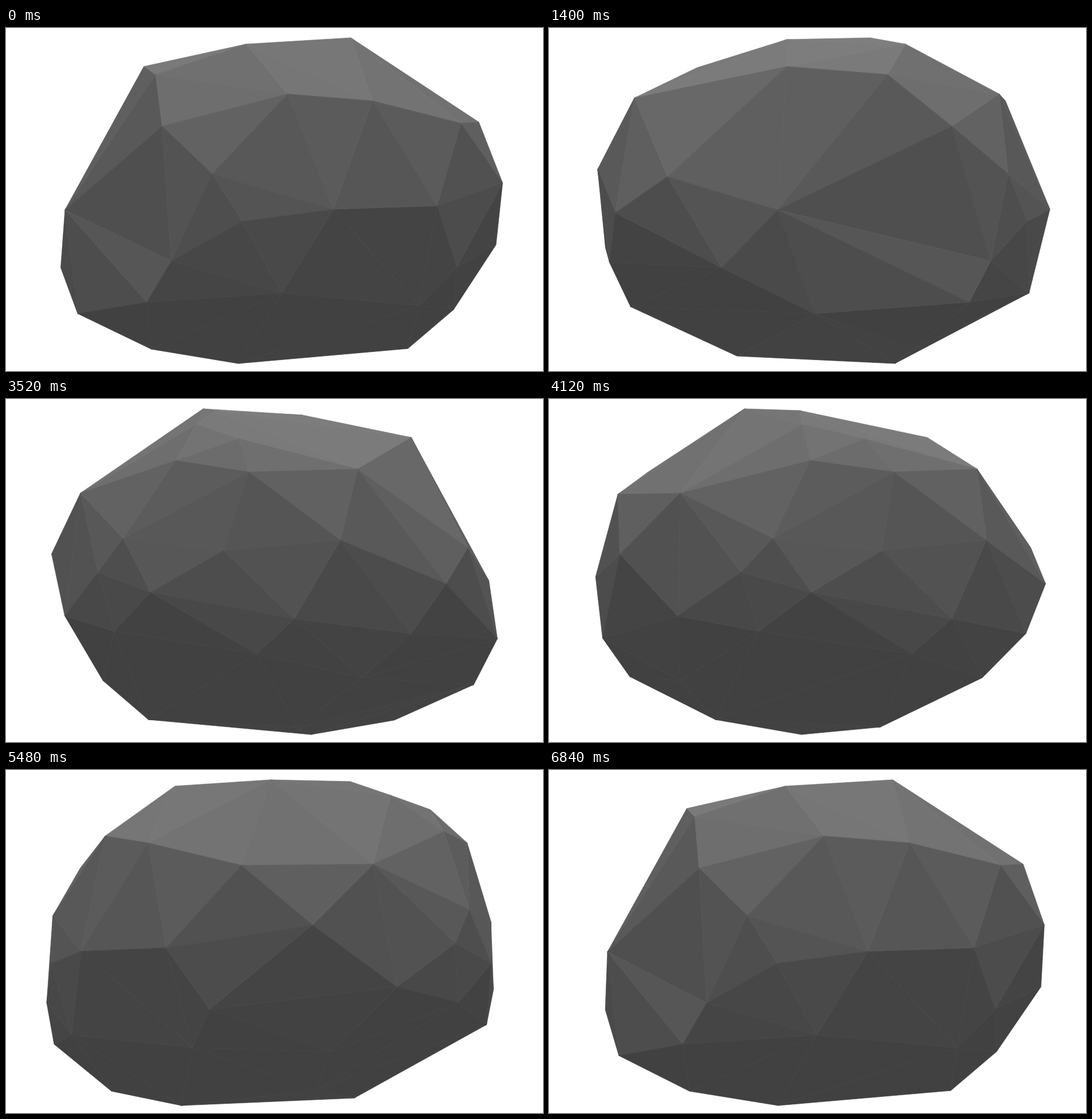
Write an HTML page with a canvas that moves like this. It is 937 by 598 pixels and loops after 6.88 s.

```html
<!DOCTYPE html>
<html lang="en">
<head>
<meta charset="utf-8">
<title>Turning rock</title>
<style>
  html, body { margin: 0; width: 100%; height: 100%; overflow: hidden; background: white; }
  canvas { display: block; }
</style>
</head>
<body>
<canvas id="stage" width="937" height="598"></canvas>
<script>
const canvas = document.getElementById('stage');
const ctx = canvas.getContext('2d');
const LOOP = 6880, STEP = 40, CENTER = 474.5, MIDDLE = 320, RADIUS = 400;
const TAU = 2 * Math.PI;

// Corners of the rock: height on the stage, bearing in degrees, optional dent.
const spots = [
  [17, 22], [20, 320], [28, 108], [44, 314], [67, 178, -29], [69, 289], [81, 139],
  [115, 87], [127, 60], [107, 309], [127, 283], [122, 249], [171, 124], [164, 349], [166, 27],
  [259, 210, -26], [246, 258], [264, 289, -23], [243, 318], [302, 326], [270, 8],
  [254, 107], [316, 76], [337, 99], [310, 46], [337, 308], [383, 270], [322, 227],
  [409, 237], [418, 190], [317, 175, -27], [406, 117], [478, 124], [462, 89], [417, 35],
  [378, 345], [405, 322], [444, 280], [484, 43], [491, 359, -22], [486, 248], [498, 165],
  [560, 133], [585, 114, -70], [572, 261, -47], [559, 0]
];

// Outline of a rounded body with a bulge low on one side.
function reach(y, bearing) {
  if (y < MIDDLE) return RADIUS * (1 - ((MIDDLE - y) / 314) ** 2) ** 0.4;
  const body = RADIUS * Math.sqrt(1 - ((y - MIDDLE) / 285) ** 2.2);
  const low = Math.min(Math.max((y - 360) / 170, 0), 1);
  return body + 100 * low * Math.exp(-(((bearing - 130) / 42) ** 2));
}

const corners = spots.map(([y, bearing, dent = 0]) => {
  const r = reach(y, bearing) + dent, a = bearing * TAU / 360;
  return { x: r * Math.cos(a), y, z: r * Math.sin(a) };
});

const dot = (p, q) => p.x * q.x + p.y * q.y + p.z * q.z;
const sub = (p, q) => ({ x: p.x - q.x, y: p.y - q.y, z: p.z - q.z });
const cross = (p, q) => ({
  x: p.y * q.z - p.z * q.y,
  y: p.z * q.x - p.x * q.z,
  z: p.x * q.y - p.y * q.x
});
const normal = (p, q, r) => cross(sub(q, p), sub(r, p));

// Pull a corner towards the unit sphere so that hollows keep their corners.
function inflate({ x, y, z }) {
  const h = (y - MIDDLE) / 290;
  const k = Math.hypot(x / RADIUS, h, z / RADIUS) ** -0.6;
  return { x: x / RADIUS * k, y: h * k, z: z / RADIUS * k };
}

function makeFace(...points) {
  const n = normal(...points);
  const up = -n.y / Math.hypot(n.x, n.y, n.z);
  const gray = Math.round(76 + 30 * up + 20 * up * up);
  return { points, n, color: `rgb(${gray},${gray},${gray})` };
}

function buildFaces() {
  const ball = corners.map(inflate), faces = [];
  ball.forEach((p, i) => ball.forEach((q, j) => ball.forEach((r, k) => {
    if (i >= j || j >= k) return;
    const n = normal(p, q, r), level = dot(n, p), side = Math.sign(level);
    const outer = ball.every(v =>
      v === p || v === q || v === r || (dot(n, v) - level) * side <= 0);
    if (!outer) return;
    const [a, b, c] = [corners[i], corners[j], corners[k]];
    faces.push(side > 0 ? makeFace(a, b, c) : makeFace(a, c, b));
  })));
  return faces;
}

const faces = buildFaces();

function draw(time) {
  const angle = Math.floor(time % LOOP / STEP) * STEP / LOOP * TAU;
  const c = Math.cos(angle), s = Math.sin(angle);
  const depth = p => p.z * c - p.x * s;
  const near = f => f.points.reduce((sum, p) => sum + depth(p), 0);

  ctx.fillStyle = 'white';
  ctx.fillRect(0, 0, canvas.width, canvas.height);
  ctx.lineWidth = 0.7;
  ctx.lineJoin = 'round';
  const visible = faces.filter(f => depth(f.n) > 0).sort((f, g) => near(f) - near(g));
  for (const f of visible) {
    ctx.beginPath();
    for (const p of f.points) ctx.lineTo(CENTER + p.x * c + p.z * s, p.y);
    ctx.closePath();
    ctx.fillStyle = ctx.strokeStyle = f.color;
    ctx.fill();
    ctx.stroke();
  }
}

const start = performance.now();
function tick() {
  draw(performance.now() - start);
  requestAnimationFrame(tick);
}
tick();
</script>
</body>
</html>
```
